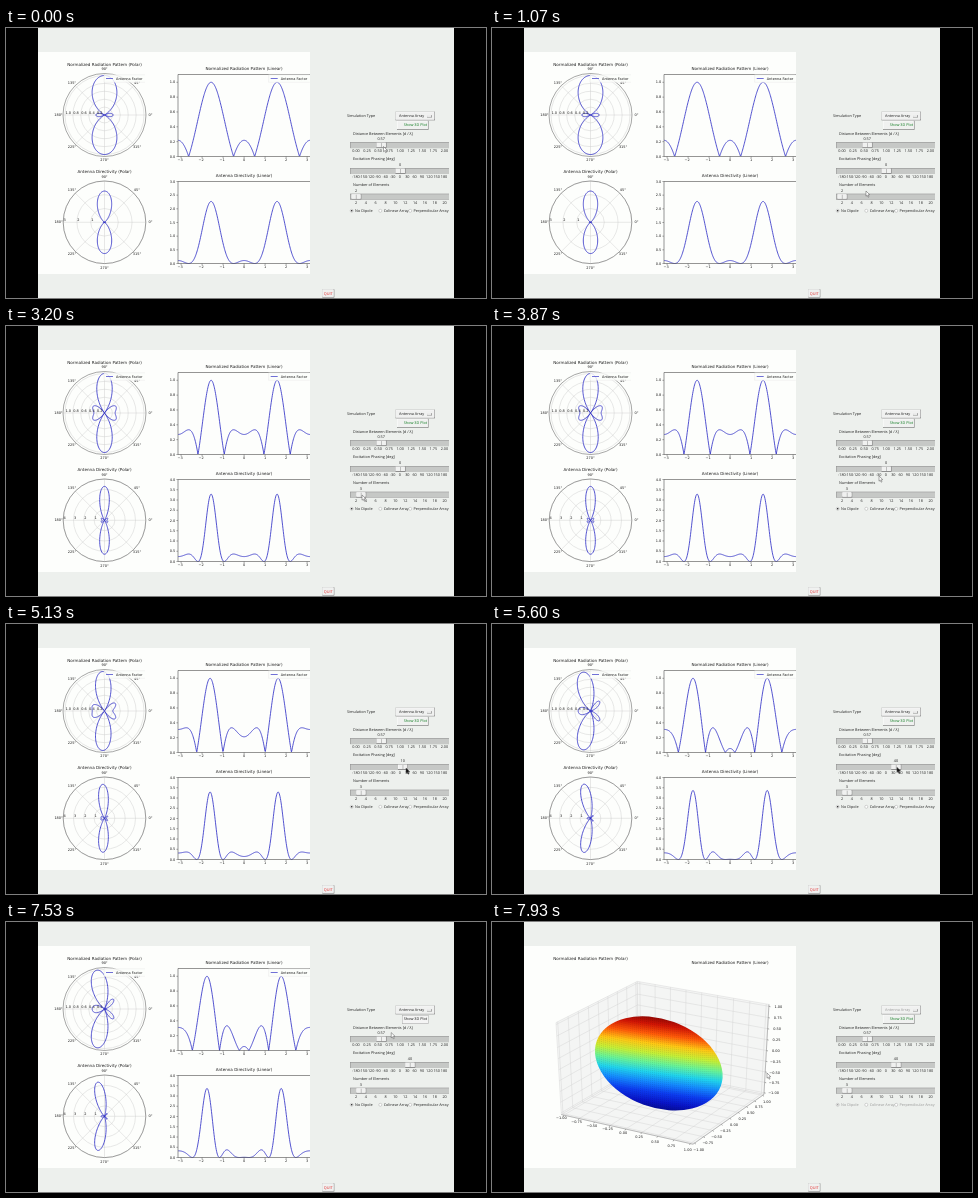
These frames come from a looping animation (480 by 270 pixels, 8000 ms). An HTML page with a canvas:

```html
<!DOCTYPE html>
<html lang="en">
<head>
<meta charset="utf-8">
<title>Antenna array simulator</title>
<style>
html, body { margin: 0; width: 100%; height: 100%; overflow: hidden; background: #000; }
canvas { display: block; width: 480px; height: 270px; }
</style>
</head>
<body>
<canvas id="stage"></canvas>
<script>
const LOOP = 8000, DISTANCE = 0.57, TAU = Math.PI * 2;
const BLUE = '#3434c8', FRAME = '#505050', PAPER = '#fdfefc', PANEL = '#edf0ed';
const PLOT_FONT = '"DejaVu Sans", sans-serif', UI_FONT = '"Open Sans", sans-serif';
const canvas = document.getElementById('stage');
const ratio = window.devicePixelRatio || 1;
canvas.width = 480 * ratio;
canvas.height = 270 * ratio;
const ctx = canvas.getContext('2d');

// [time, value] steps
const ELEMENTS = [[0, 2], [2300, 3]];
const PHASE = [[0, 0], [4600, 10], [5270, 20], [5400, 30], [5600, 40]];
const PRESSED = [[0, false], [7000, true], [7670, false]];
const SPATIAL = [[0, false], [7730, true]];
const POINTER_FILL = [[0, '#fff'], [1930, '#111'], [3200, '#fff'], [4330, '#111'], [6130, '#fff']];
// [time, x, y] of the pointer tip
const POINTER = [
  [0, 377.5, 118.5], [270, 377.5, 118.5], [1070, 374, 163], [1930, 356, 168], [2200, 354, 168.5],
  [2600, 354.5, 168.5], [2670, 356, 169], [3200, 356, 169], [3870, 387, 150], [4330, 395, 144],
  [4470, 395.5, 144], [4930, 399.5, 144], [5130, 400, 144], [5800, 407, 143], [6130, 407, 143],
  [6400, 404, 123.5], [6930, 402, 97], [7330, 402, 97], [7530, 385.5, 110.5], [7930, 275, 151], [8000, 275, 151]
];

const stepAt = (table, t) => table.filter(row => row[0] <= t).pop()[1];
const range = (n, f) => Array.from({ length: n }, (_, i) => f(i));

function pointerAt(t) {
  const i = POINTER.findIndex(row => row[0] > t);
  const [t0, x0, y0] = POINTER[i - 1], [t1, x1, y1] = POINTER[i];
  const p = (t - t0) / (t1 - t0);
  return [x0 + (x1 - x0) * p, y0 + (y1 - y0) * p];
}

function text(str, x, y, size = 3.5, { align = 'center', color = '#1c1c1c', font = PLOT_FONT } = {}) {
  ctx.font = `${size}px ${font}`;
  ctx.textAlign = align;
  ctx.fillStyle = color;
  ctx.fillText(str, x, y);
}

function label(str, x, y, align = 'left', color = '#1c1c1c') {
  text(str, x, y, 3.78, { align, color, font: UI_FONT });
}

function rect(x, y, w, h, fill) {
  ctx.fillStyle = fill;
  ctx.fillRect(x, y, w, h);
}

function path(points, color, width, { fill, close } = {}) {
  ctx.beginPath();
  points.forEach(([x, y]) => ctx.lineTo(x, y));
  if (close) ctx.closePath();
  if (fill) { ctx.fillStyle = fill; ctx.fill(); }
  if (color) { ctx.strokeStyle = color; ctx.lineWidth = width; ctx.stroke(); }
}

const line = (x0, y0, x1, y1, color = FRAME, width = 0.5) => path([[x0, y0], [x1, y1]], color, width);

function circle(x, y, r, color, width, fill) {
  ctx.beginPath();
  ctx.arc(x, y, r, 0, TAU);
  if (fill) { ctx.fillStyle = fill; ctx.fill(); }
  ctx.strokeStyle = color;
  ctx.lineWidth = width;
  ctx.stroke();
}

function raised(x, y, w, h, fill = '#f0f1f0') {
  rect(x, y, w, h, '#777');
  rect(x, y, w - 0.7, h - 0.7, '#fff');
  rect(x + 0.5, y + 0.5, w - 1.2, h - 1.2, fill);
}

// Uniform linear array
function arrayFactor(n, beta) {
  return theta => {
    const half = (TAU * DISTANCE * Math.cos(theta) + beta) / 2;
    const s = Math.sin(half);
    return Math.abs(s) < 1e-6 ? 1 : Math.abs(Math.sin(n * half) / (n * s));
  };
}

function directivity(factor) {
  const steps = 200, d = Math.PI / steps;
  let power = 0;
  for (let i = 0; i < steps; i++) {
    const a = (i + 0.5) * d;
    power += factor(a) ** 2 * Math.sin(a) * d;
  }
  return theta => 2 / power * factor(theta) ** 2;
}

const sample = f => range(361, i => { const a = (i / 180 - 1) * Math.PI; return [a, f(a)]; });

function legend(x, y) {
  ctx.globalAlpha = 0.8;
  rect(x, y, 41, 7.5, PAPER);
  ctx.globalAlpha = 1;
  path([[x + 41, y], [x, y], [x, y + 7.5], [x + 41, y + 7.5]], '#e4e4e4', 0.4);
  line(x + 2, y + 3.7, x + 9, y + 3.7, BLUE, 0.7);
  text('Antenna Factor', x + 12, y + 3.8, 3.5, { align: 'left' });
}

function polarPlot(cx, cy, r, f, max, ticks) {
  for (const [value] of ticks) circle(cx, cy, r * value / max, '#c4c4c4', 0.4);
  range(8, i => i * Math.PI / 4).forEach((a, i) => {
    const c = Math.cos(a), s = Math.sin(a);
    line(cx, cy, cx + r * c, cy - r * s, '#c4c4c4', 0.4);
    text(i * 45 + '°', cx + (r + 4.6) * c, cy - (r + 4) * s);
  });
  path(sample(f).map(([a, v]) => [cx + r * v / max * Math.cos(a), cy - r * v / max * Math.sin(a)]), BLUE, 0.85);
  circle(cx, cy, r, FRAME, 0.5);
  for (const [value, name] of ticks) text(name, cx - r * value / max + 0.4, cy - 1.8, 3.5, { align: 'left' });
}

// The right edge of the frame lies outside the visible panel
function linearPlot(top, bottom, f, max, ticks) {
  const toX = a => 238.1 + 21 * a, toY = v => bottom - (bottom - top) * v / max;
  for (const v of ticks) {
    line(170.4, toY(v), 172, toY(v));
    text(v.toFixed(1), 169.3, toY(v) + 0.2, 3.5, { align: 'right' });
  }
  for (let a = -3; a <= 3; a++) {
    line(toX(a), bottom, toX(a), bottom + 1.6);
    text(String(a).replace('-', '−'), toX(a) - (a < 0 ? 1 : 0), bottom + 4);
  }
  path(sample(f).map(([a, v]) => [toX(a), toY(v)]), BLUE, 0.85);
  path([[304, top], [172, top], [172, bottom], [304, bottom]], FRAME, 0.6);
}

function flatPlots(n, beta) {
  const factor = arrayFactor(n, beta), gain = directivity(factor);
  const top = n + 1;
  polarPlot(98.5, 87, 41.5, factor, 1.05, range(5, i => [(i + 1) / 5, ((i + 1) / 5).toFixed(1)]));
  legend(98, 46.8);
  linearPlot(46.5, 128.5, factor, 1.105, range(6, i => i / 5));
  legend(262.7, 46.8);
  polarPlot(98.5, 194.3, 41.3, gain, top, range(top, i => [i + 1, String(i + 1)]));
  linearPlot(153.5, 235.5, gain, top, range(top * 2 + 1, i => i / 2));
  text('Antenna Directivity (Polar)', 98.5, 144.2, 4.1);
  text('Antenna Directivity (Linear)', 238, 148.2, 4.1);
}

// Perspective at elevation 30°, azimuth -60°, for a unit cube around the origin
function project(x, y, z) {
  const k = 10 / (10 - (0.433 * x - 0.75 * y + 0.5 * z));
  return [172.2 + 152 * k * (0.866 * x + 0.5 * y),
          138 - 105 * k * (-0.25 * x + 0.433 * y + 0.866 * z)];
}

function ellipsoid() {
  ctx.save();
  const fade = ctx.createLinearGradient(173, 94, 160, 189);
  ['#800404', '#d01404', '#ff5a08', '#ffc814', '#c4f038', '#68f498', '#20d4ee', '#1488ff', '#0c3cf0', '#0814c8', '#040880']
    .forEach((c, i) => fade.addColorStop(i / 10, c));
  ctx.beginPath();
  ctx.ellipse(166.8, 141.4, 66, 44, Math.PI / 9, 0, TAU);
  ctx.fillStyle = fade;
  ctx.fill();
  ctx.clip();
  // fine dotted mesh of the surface
  ctx.strokeStyle = 'rgba(0,0,0,.2)';
  ctx.lineWidth = 0.7;
  ctx.setLineDash([0.7, 1.3]);
  for (let y = 70; y < 212; y += 2) {
    ctx.beginPath();
    ctx.moveTo(98, y - 12);
    ctx.quadraticCurveTo(160, y + 8, 238, y + 8);
    ctx.stroke();
  }
  ctx.restore();
}

function spatialPlot() {
  const h = 0.5, edge = '#999', grid = '#d2d2d2';
  const at = pts => pts.map(p => project(...p));
  const panes = [
    [[-h, -h, -h], [-h, h, -h], [-h, h, h], [-h, -h, h]],
    [[-h, h, -h], [h, h, -h], [h, h, h], [-h, h, h]],
    [[-h, -h, -h], [h, -h, -h], [h, h, -h], [-h, h, -h]]
  ];
  panes.forEach(p => path(at(p), '#d8d8d8', 0.5, { fill: '#f4f5f4', close: true }));
  range(9, i => i / 4 - 1).forEach(v => {
    const q = v * 0.48, name = v.toFixed(2).replace('-', '−');
    path(at([[q, -h, -h], [q, h, -h], [q, h, h]]), grid, 0.45);
    path(at([[h, q, -h], [-h, q, -h], [-h, q, h]]), grid, 0.45);
    path(at([[-h, -h, q], [-h, h, q], [h, h, q]]), grid, 0.45);
    const tick = ([x, y], dx, dy, tx, ty) => {
      line(x, y, x + tx, y + ty, '#333', 0.4);
      text(name, x + dx, y + dy);
    };
    tick(project(q, -h, -h), -2.5, 4.5 + v * 1.8, -0.8, 1.4);
    tick(project(h, q, -h), 4.2, 6.5, 1.4, 0.9);
    tick(project(h, h, q), 9.5, 0.8, 1.6, 0.4);
  });
  path(at([[-h, -h, -h], [h, -h, -h], [h, h, -h], [h, h, h]]), edge, 0.6);
  ellipsoid();
}

function slider(y, name, value, thumbX, ticks) {
  label(name, 347, y);
  label(value, thumbX, y + 5.7, 'center');
  rect(344, y + 8.5, 99, 6, '#8c8c8c');
  rect(344.5, y + 9, 98.5, 5.5, '#c6c8c6');
  raised(thumbX - 4.7, y + 9, 10, 5.2);
  line(thumbX + 0.3, y + 9.5, thumbX + 0.3, y + 13.8, '#888', 0.5);
  ticks.forEach(([str, x]) => label(str, x, y + 17.7, 'center'));
}

function controls(n, degrees, pressed, spatial) {
  const ink = spatial ? '#999' : '#1c1c1c';
  label('Simulation Type', 341, 88.2);
  raised(389.5, 83.7, 39.5, 8.6);
  label('Antenna Array', 393, 88.2, 'left', ink);
  raised(421, 87.2, 5, 2.2);
  if (pressed) {
    rect(396, 93, 26.4, 8.8, '#999');
    rect(396.4, 93.4, 25.6, 8, '#f4f4f4');
  } else {
    raised(391, 92.8, 31.5, 9);
  }
  label('Show 3D Plot', 409.4, 97.3, 'center', pressed ? '#111' : '#0a7a1c');

  slider(105.6, 'Distance Between Elements [d / λ]', DISTANCE.toFixed(2), 350 + DISTANCE * 44.2,
    range(9, i => [(i / 4).toFixed(2), 350 + i * 11.05]));
  slider(131.5, 'Excitation Phasing [deg]', String(degrees), 394.2 + degrees * 0.244,
    range(13, i => [String(i * 30 - 180), 349.9 + i * 7.34]));
  slider(157.2, 'Number of Elements', String(n), 350 + (n - 2) * 4.92,
    range(10, i => [String(i * 2 + 2), 350 + i * 9.84]));

  [['No Dipole', 345.7], ['Colinear Array', 374.3], ['Perpendicular Array', 407.6 - 3.4]].forEach(([name, x], i) => {
    circle(x, 182.8, 1.5, '#999', 0.4, '#fff');
    if (i === 0) {
      ctx.beginPath();
      ctx.arc(x, 182.8, 0.8, 0, TAU);
      ctx.fillStyle = ink;
      ctx.fill();
    }
    label(name, x + 3.4, 183.1, 'left', ink);
  });

  raised(316.3, 261.3, 12, 8.2);
  label('QUIT', 322.2, 265.6, 'center', '#e02020');
}

function pointer(x, y, fill) {
  const shape = [[0, 0], [0, 5.2], [1.2, 4.2], [2.1, 6.2], [3, 5.8], [2.1, 3.8], [3.8, 3.7]];
  path(shape.map(([dx, dy]) => [x + dx, y + dy]), '#555', 0.5, { close: true, fill });
}

function draw(t) {
  const n = stepAt(ELEMENTS, t), degrees = stepAt(PHASE, t), spatial = stepAt(SPATIAL, t);
  ctx.setTransform(ratio, 0, 0, ratio, 0, 0);
  ctx.textBaseline = 'middle';
  ctx.textRendering = 'geometricPrecision';
  ctx.lineJoin = 'round';
  rect(0, 0, 480, 270, '#000');
  rect(32, 0, 416, 270, PANEL);
  rect(32, 24, 272, 222, PAPER);
  text('Normalized Radiation Pattern (Polar)', 98.5, 37.3, 4.1);
  text('Normalized Radiation Pattern (Linear)', 238, 41.4, 4.1);
  if (spatial) {
    spatialPlot();
  } else {
    ctx.save();
    ctx.beginPath();
    ctx.rect(32, 24, 272, 222);
    ctx.clip();
    flatPlots(n, degrees * Math.PI / 180);
    ctx.restore();
  }
  controls(n, degrees, stepAt(PRESSED, t), spatial);
  pointer(...pointerAt(t), stepAt(POINTER_FILL, t));
}

const start = performance.now();
function frame() {
  draw((performance.now() - start) % LOOP);
  requestAnimationFrame(frame);
}
frame();
</script>
</body>
</html>
```
